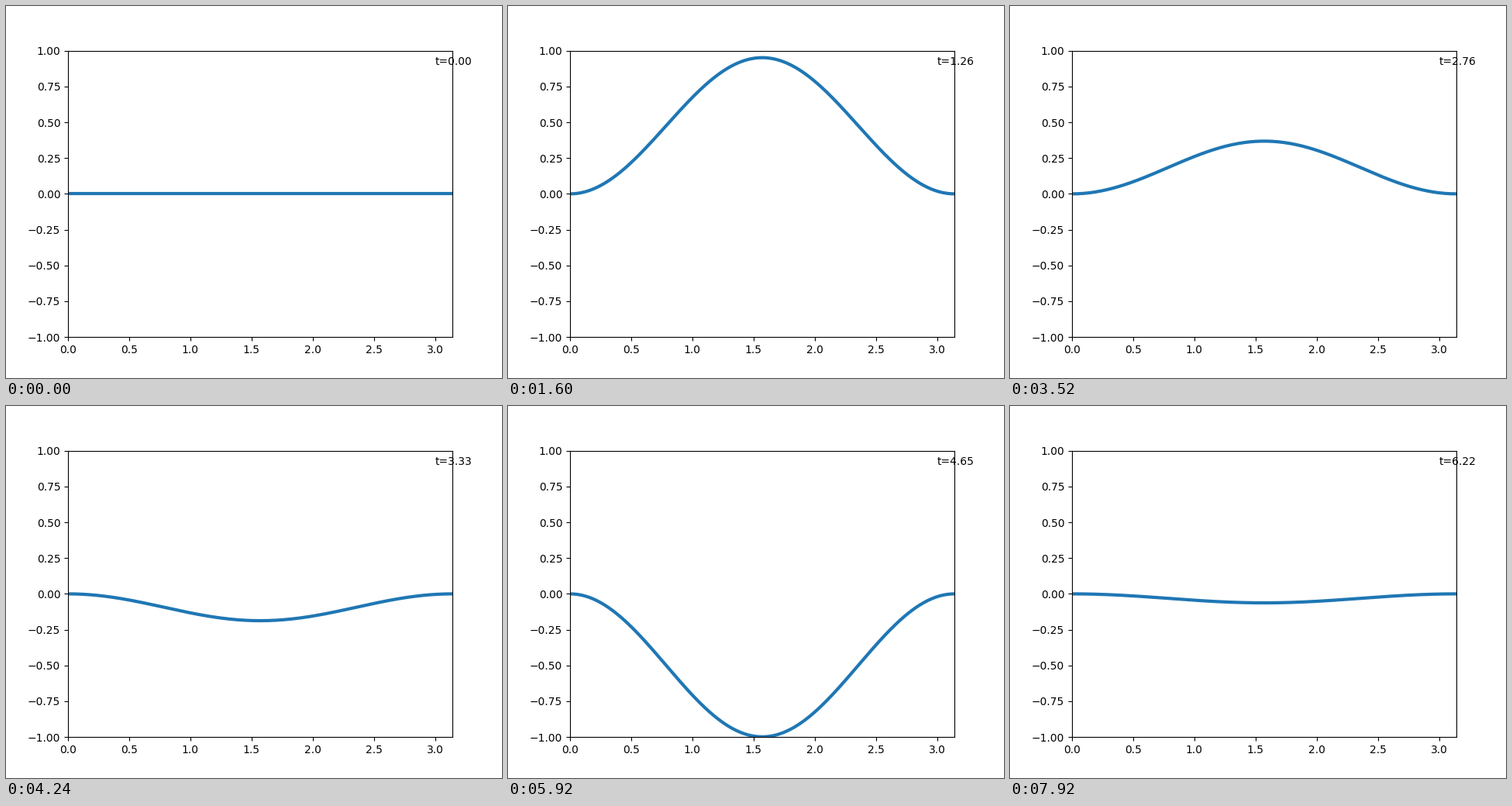
Write a matplotlib script that moves like this. It is 640 px wide and 480 px high and loops after 8 s.

```python
import numpy as np
import matplotlib.pyplot as plt
from matplotlib.animation import FuncAnimation

FRAMES = 100
INTERVAL = 80  # ms

fig, ax = plt.subplots(figsize=(6.4, 4.8), dpi=100)
ax.set_xlim(0, np.pi)
ax.set_ylim(-1, 1)

x = np.linspace(0, np.pi, 200)
shape = np.sin(x) ** 2
wave, = ax.plot(x, 0 * x, color="C0", lw=3)
label = ax.text(3, 0.9, "t=0.00")


def update(i):
    t = 2 * np.pi * i / FRAMES
    wave.set_ydata(shape * np.sin(t))
    label.set_text(f"t={t:.2f}")
    return wave, label


anim = FuncAnimation(fig, update, frames=FRAMES, interval=INTERVAL,
                     repeat=True, repeat_delay=0)
plt.show()
```
